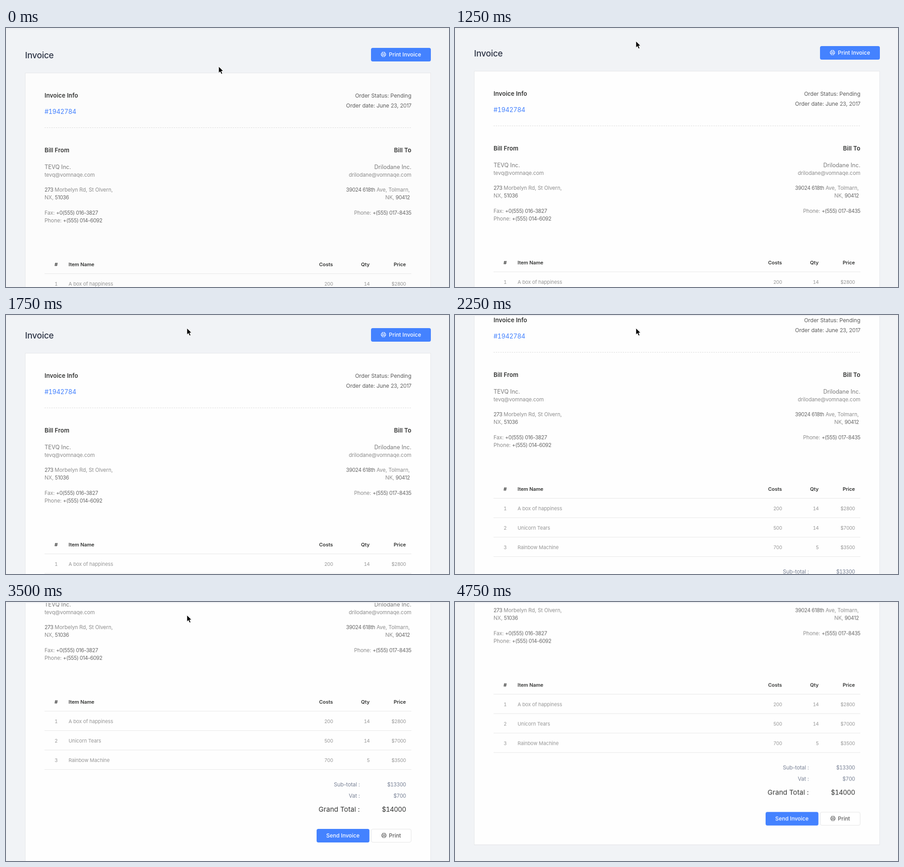
An HTML page that plays this animation: 977 by 573 pixels, repeating every 5500 ms.

```html
<!DOCTYPE html>
<html lang="en">
<head>
<meta charset="utf-8">
<title>Invoice</title>
<style>
  html, body { margin: 0; width: 100%; height: 100%; overflow: hidden; background: #f1f3f6; }
  svg { display: block; width: 977px; height: 573px; }
  text { font-family: Inter, Roboto, sans-serif; white-space: pre; }
  .end { text-anchor: end; }
  .mid { text-anchor: middle; }
  .title { font-size: 19px; font-weight: 500; letter-spacing: -.3px; fill: #2d3446; }
  .head { font-size: 13px; font-weight: 600; letter-spacing: .1px; fill: #323332; }
  .id { font-size: 14px; letter-spacing: -.33px; fill: #4482ff; }
  .order { font-size: 12px; letter-spacing: -.03px; fill: #595959; }
  .name { font-size: 12.5px; fill: #797979; }
  .line { font-size: 11.5px; letter-spacing: -.05px; fill: #8c8c8c; }
  .num { letter-spacing: -.42px; fill: #666; }
  .th { font-size: 11px; font-weight: 600; letter-spacing: -.05px; fill: #323332; }
  .td { font-size: 11px; letter-spacing: -.1px; fill: #969696; }
  .fig { font-size: 10.6px; letter-spacing: -.5px; fill: #969696; }
  .sum { font-size: 12px; letter-spacing: -.15px; fill: #788195; }
  .sumfig { font-size: 11.5px; letter-spacing: -.55px; fill: #788195; }
  .grand { font-size: 15px; letter-spacing: .05px; fill: #323332; }
  .grandfig { font-size: 14.5px; letter-spacing: -.55px; fill: #323332; }
  .id, .fig, .sumfig, .grandfig { font-variant-numeric: tabular-nums; }
  .btn { font-size: 11.9px; font-weight: 500; letter-spacing: .03px; fill: #fff; }
  .plain { fill: #595959; }
  .blue { fill: #4482ff; }
  .rule { stroke: #e7e7e7; }
</style>
</head>
<body>
<svg viewBox="0 0 977 573">
  <defs>
    <g id="printer" fill="none" stroke-width="1">
      <path d="M2.5 3V.5h6V3M2.5 7.5h-2v-4.2h10v4.2h-2M2.5 5.8h6v4.4h-6zM4 7.5h3"/>
    </g>
  </defs>
  <g id="page">
    <rect id="card" x="42.5" y="99.5" width="894" height="777" fill="#fcfcfc" stroke="#e6e7ea"/>
    <rect class="blue" x="805" y="44" width="132" height="30" rx="4"/>
    <use href="#printer" x="827" y="53" stroke="#fff"/>
    <path d="M85 220.5H894" stroke="#dcdcdc" stroke-dasharray="3 2"/>
    <rect class="blue" x="685" y="804" width="116.5" height="30" rx="4"/>
    <rect x="805.5" y="804.5" width="88" height="29" rx="3.5" fill="#fff" stroke="#e5e5e5"/>
    <use href="#printer" x="828" y="813" stroke="#595959"/>
  </g>
  <rect width="977" height="1" fill="#f6f7f9"/>
  <rect y="1" width="977" height="1" fill="#e4e6ea"/>
  <g id="cursor">
    <path d="M0 0V14.6L3.4 11.5 5.7 17 8.4 15.9 6.1 10.6H10.4Z" fill="#000" stroke="#fff" stroke-width="1" stroke-linejoin="round"/>
  </g>
</svg>
<script>
const LOOP = 5500;
const page = document.getElementById('page');
const card = document.getElementById('card');
const cursor = document.getElementById('cursor');

function el(tag, attrs, parent) {
  const node = document.createElementNS('http://www.w3.org/2000/svg', tag);
  for (const key in attrs) node.setAttribute(key, attrs[key]);
  return parent.appendChild(node);
}

// Parts wrapped in asterisks get the tighter number style.
function put(x, y, cls, str) {
  const node = el('text', { x, y, class: cls }, page);
  str.split('*').forEach((part, i) => {
    if (part) el('tspan', i % 2 ? { class: 'num' } : {}, node).textContent = part;
  });
}

const left = (y, cls, str) => put(85, y, cls, str);
const right = (y, cls, str, x = 894) => put(x, y, cls + ' end', str);

put(42, 66.5, 'title', 'Invoice');
put(844.5, 63, 'btn', 'Print Invoice');

left(154, 'head', 'Invoice Info');
left(189.5, 'id', '#1942784');
right(154, 'order', 'Order Status: Pending');
right(175.5, 'order', 'Order date: June *23*, *2017*');

left(274.5, 'head', 'Bill From');
left(312, 'name', 'TEVQ Inc.');
left(328.5, 'line', 'tevq@vomnaqe.com');
left(362, 'line', '*273* Morbelyn Rd, St Olvern,');
left(379, 'line', 'NX, *51036*');
left(412.5, 'line', 'Fax: *+0(555) 016-3827*');
left(429.5, 'line', 'Phone: *+(555) 014-6092*');

right(274.5, 'head', 'Bill To');
right(312, 'name', 'Drilodane Inc.');
right(328.5, 'line', 'drilodane@vomnaqe.com');
right(362, 'line', '*39024 618th* Ave, Tolmarn,', 890.5);
right(379, 'line', 'NK, *90412*', 890.5);
right(412.5, 'line', 'Phone: *+(555) 017-8435*');

const cols = [721, 802, 882];
put(107, 526.5, 'th', '#');
put(138, 526.5, 'th', 'Item Name');
['Costs', 'Qty', 'Price'].forEach((s, i) => right(526.5, 'th', s, cols[i]));
el('path', { class: 'rule', d: 'M85 543.5H894' }, page);

[
  ['A box of happiness', '200', '14', '$2800'],
  ['Unicorn Tears', '500', '14', '$7000'],
  ['Rainbow Machine', '700', '5', '$3500']
].forEach(([item, ...figs], row) => {
  const y = 569.5 + row * 43;
  right(y, 'fig', String(row + 1), 113.5);
  put(138, y, 'td', item);
  figs.forEach((s, i) => right(y, 'fig', s, cols[i]));
  el('path', { class: 'rule', d: `M85 ${y + 17}H894` }, page);
});

[
  [710, 'sum', 'Sub-total :', '$13300'],
  [735, 'sum', 'Vat :', '$700'],
  [765.5, 'grand', 'Grand Total :', '$14000']
].forEach(([y, cls, label, value]) => {
  right(y, cls, label, 780.5);
  right(y, cls + 'fig', value, 882);
});

put(743, 823, 'btn mid', 'Send Invoice');
put(844.5, 823, 'btn plain', 'Print');

// Each step is [start in ms, value]; values hold until the next step.
function play(node, prop, steps, css = v => v) {
  const frames = steps.map(([t, v]) => ({ offset: t / LOOP, [prop]: css(v), easing: 'step-end' }));
  frames.push({ offset: 1, [prop]: css(steps[steps.length - 1][1]) });
  node.animate(frames, { duration: LOOP, iterations: Infinity });
}

play(page, 'transform', [
  [0, 0], [1250, 4], [1500, 11], [1750, 15], [2250, 138],
  [2750, 235], [3250, 272], [3500, 302], [4000, 339.5]
], y => `translate(0px, ${-y}px)`);

play(card, 'fill', [[0, '#fcfcfc'], [1250, '#fefefe']]);

play(cursor, 'transform', [
  [0, [469, 85]], [250, [399, 23.5]], [1000, [399, 29]]
], ([x, y]) => `translate(${x}px, ${y}px)`);

play(cursor, 'opacity', [[0, 1], [4750, 0]]);
</script>
</body>
</html>
```
